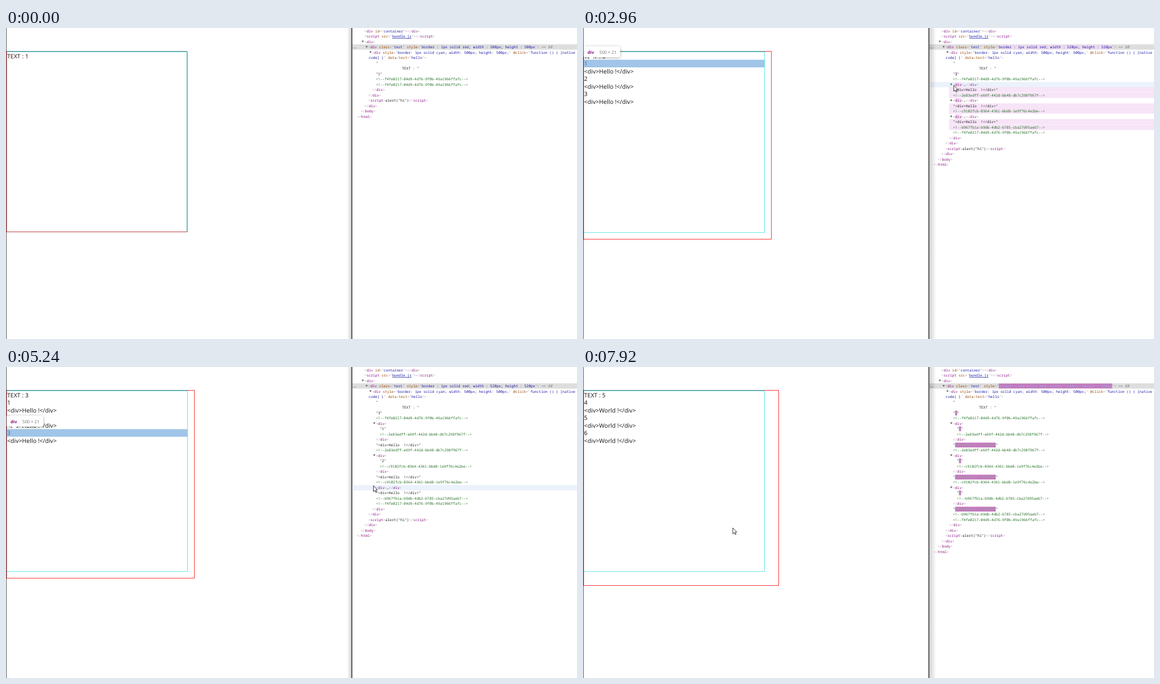
An HTML page with a canvas for the animation above (8000 ms loop, 1014x553 px).

```html
<!DOCTYPE html>
<html lang="en">
<head>
<meta charset="utf-8">
<title>Live DOM updates</title>
<style>
html, body { margin: 0; width: 100%; height: 100%; overflow: hidden; background: #fff; }
canvas { display: block; }
</style>
</head>
<body>
<canvas id="stage" width="1014" height="553"></canvas>
<script>
const ctx = document.getElementById('stage').getContext('2d');
ctx.textRendering = 'geometricPrecision';

const LOOP = 8000, W = 1014, H = 553;
const SCALE = 0.642, ROW = 9.5, SPLIT = 614;
const MONO = '6.33px "Noto Sans Mono", "DejaVu Sans Mono", monospace';
const SANS = '"Noto Sans", "Open Sans", sans-serif';
const C = {
  tag: [136, 18, 128], punct: [168, 148, 166], attr: [153, 69, 0],
  value: [26, 26, 166], comment: [35, 110, 37], text: [34, 34, 34], dim: [120, 120, 120]
};

const clicks = [830, 1790, 6480, 7640];
const opens = [3360, 4600, 5400];
const ids = [
  '2e83edff-e69f-442d-bb48-db7c298f967f',
  'c9102fcb-0364-4361-bbd8-1e9f76c4e2be',
  'b967fb1a-b9db-4db2-b785-cba27d95aeb7'
];
const ROOT_ID = 'f4fe0217-04d9-4d76-9f0b-49a1966ffafc';

// Pointer path: time, x, y
const path = [
  [290, 443, 492], [510, 255, 322], [670, 255, 322], [680, 254, 331],
  [2400, 254, 331], [2580, 247, 306], [2900, 658, 101.5], [3370, 658, 101.5],
  [3800, 655, 157], [4230, 655, 157], [4330, 654, 152], [4390, 654, 152],
  [4460, 653, 155], [4650, 653, 155], [5080, 652, 210.5], [5500, 652, 210.5],
  [5650, 600, 232], [5870, 480, 263], [5940, 459, 266], [6180, 269, 285.5],
  [6320, 269, 285.5], [6330, 262, 286], [6470, 262, 286], [6480, 267.5, 285.5],
  [7510, 267.5, 285.5], [7520, 265.5, 285.5], [8000, 265.5, 285.5]
];

const mix = (a, b, p) => a.map((v, i) => v + (b[i] - v) * p);
const rgb = (c, a = 1) => `rgba(${c.map(Math.round).join()},${a})`;

function rect(x, y, w, h, color) {
  ctx.fillStyle = color;
  ctx.fillRect(x, y, w, h);
}

function poly(points, color) {
  ctx.beginPath();
  points.forEach(([x, y]) => ctx.lineTo(x, y));
  ctx.closePath();
  ctx.fillStyle = color;
  ctx.fill();
}

function label(text, x, y, font, color) {
  ctx.font = font;
  ctx.fillStyle = color;
  ctx.fillText(text, x, y);
}

// CSS "ease" timing curve
function ease(x) {
  let lo = 0, hi = 1, s = 0.5;
  for (let i = 0; i < 20; i++) {
    s = (lo + hi) / 2;
    const bx = 0.75 * s * (1 - s) ** 2 + 0.75 * s * s * (1 - s) + s ** 3;
    if (bx < x) lo = s; else hi = s;
  }
  return 0.3 * s * (1 - s) ** 2 + 3 * s * s * (1 - s) + s ** 3;
}

// Purple update highlight, white text fading to its own colour
function flashAt(age) {
  const k = age / 1400;
  if (k < 0 || k >= 1) return null;
  const p = k < 0.8 ? ease(k / 0.8) : 1;
  const alpha = k < 0.8 ? 1 : 1 - ease((k - 0.8) / 0.2);
  return { p, bg: rgb(mix([158, 54, 153], [245, 219, 244], p), alpha) };
}

function pointer(t) {
  if (t < path[0][0]) return null;
  const i = path.findIndex(k => k[0] > t);
  const a = path[i - 1], b = path[i];
  return mix(a, b, (t - a[0]) / (b[0] - a[0])).slice(1);
}

// Tree row builders: a segment is [text, colour, flash, underline]
const open = (name, attrs = [], flash) => [
  ['<', C.punct], [name, C.tag, flash],
  ...attrs.flatMap(([k, v, f, u]) =>
    [[' ' + k, C.attr], ['="', C.punct], [v, C.value, f, u], ['"', C.punct]]),
  ['>', C.punct]
];
const close = name => [['</', C.punct], [name, C.tag], ['>', C.punct]];
const comment = id => [[`<!--${id}-->`, C.comment]];
const quoted = (s, flash) => [['"', C.text], [s, C.text, flash], ['"', C.text]];

function state(t) {
  const n = clicks.filter(c => t >= c).length;
  const last = n ? flashAt(t - clicks[n - 1]) : null;
  return {
    n, last, size: 500 + 10 * n, listed: n >= 2,
    word: n < 4 ? 'Hello' : 'World', base: n < 4 ? 1 : 4
  };
}

function treeRows(t, s) {
  const rows = [];
  const add = (level, segs, more) => rows.push({ x: 623 + 6.8 * level, segs, ...more });
  const px = s.size + 'px';

  add(2, [...open('div', [['id', 'container']]), ...close('div')]);
  add(2, [...open('script', [['src', 'bundle.js', null, true]]), ...close('script')]);
  add(2, open('div'), { arrow: 'open' });
  add(3, [...open('div', [['class', 'test'],
    ['style', `border : 1px solid red; width : ${px}; height : ${px}`, s.last]]),
    [' == ', C.dim], ['$0', C.dim, null, false, true]], { arrow: 'open', selected: true });
  add(4, open('div', [['style', 'border: 1px solid cyan; width: 500px; height: 500px;'],
    ['@click', 'function () { [native']]).slice(0, -2), { arrow: 'open' });
  add(3.1, [['code] }', C.value], ['"', C.punct], [' data-test', C.attr], ['="', C.punct],
    ['hello', C.value], ['">', C.punct]]);
  add(5, [['"', C.text]]);
  add(11.8, [['TEXT : "', C.text]]);
  add(5, quoted(String(s.n + 1), s.last));
  add(5, comment(ROOT_ID));

  if (s.listed) ids.forEach((id, i) => {
    const fresh = s.n === 2 ? s.last : null;
    const changed = s.n === 4 ? s.last : null;
    if (t >= opens[i]) {
      add(5, open('div'), { arrow: 'open', item: i });
      add(6, quoted(String(s.base + i), changed));
      add(6, comment(id));
      add(5, close('div'));
    } else {
      add(5, [...open('div', [], fresh), ['…', C.text], ...close('div')],
        { arrow: 'closed', item: i });
    }
    add(5, quoted(`<div>${s.word}  !</div>`, changed), { flash: fresh });
    add(5, comment(id), { flash: fresh });
  });

  add(5, comment(ROOT_ID));
  add(4, close('div'));
  add(3, close('div'));
  add(3, [...open('script'), ['alert("hi")', C.text], ...close('script')]);
  add(2, close('div'));
  add(1, close('body'));
  add(0, close('html'));
  return rows;
}

function drawRow(row, i, hovered) {
  const top = Math.round(i * ROW + 0.75), mid = 5.5 + i * ROW;
  if (row.selected) rect(615, top, W - 615, ROW, '#dedede');
  else if (hovered) rect(617, top, W - 617, ROW, '#ebf2fc');
  if (row.flash) rect(650, top, W - 650, ROW, row.flash.bg);
  if (row.selected) label('…', 616, mid + 1.5, '8px ' + SANS, '#555');

  const ax = row.x - 6, ay = mid - 0.5;
  if (row.arrow === 'open') poly([[ax + 1, ay - 1.6], [ax + 5, ay - 1.6], [ax + 3, ay + 1.9]], '#666');
  if (row.arrow === 'closed') poly([[ax + 1.8, ay - 2.2], [ax + 5, ay], [ax + 1.8, ay + 2.2]], '#666');

  let x = row.x;
  for (const [text, color, flash, underline, italic] of row.segs) {
    ctx.font = (italic ? 'italic ' : '') + MONO;
    const w = ctx.measureText(text).width;
    if (flash) rect(x, top + 0.5, w, 8.5, flash.bg);
    ctx.fillStyle = rgb(flash ? mix([255, 255, 255], color, flash.p) : color);
    ctx.fillText(text, x, mid + 2.4);
    if (underline) rect(x, mid + 3.2, w, 0.7, rgb(color));
    x += w;
  }
}

function drawPage(s) {
  rect(0, 0, 1, H, '#5a5a5a');
  const right = Math.floor(321.4 + 6.42 * s.n);
  const bottom = Math.floor(362.4 + 6.42 * s.n);
  if (s.n) {
    rect(322, 41, right - 321, 1, '#f33');
    rect(right, 41, 1, bottom - 40, '#f33');
    rect(1, bottom, right, 1, '#f33');
    rect(322, 42, 1, 321, '#62e8e8');
    rect(1, 363, 322, 1, '#62e8e8');
  } else {
    rect(321, 42, 1, 321, '#1a9a9a');
    rect(322, 42, 1, 321, '#8ff5f5');
    rect(1, 362, 321, 1, '#c24242');
  }
  rect(1, 41, 321, 1, '#4b8385');
  rect(1, 42, 321, 1, '#7fdcdc');
  rect(0.5, 41, 1, bottom - 40, '#931c1c');

  const lines = [`TEXT : ${s.n + 1}`];
  if (s.listed) ids.forEach((_, i) => lines.push(s.base + i, `<div>${s.word} !</div>`));
  lines.forEach((text, i) => label(text, 2, 53.7 + 13.5 * i, '10.5px ' + SANS,
    s.listed ? '#222' : '#3a1a14'));
}

function drawInspect(item) {
  const y = 56.5 + 27 * item, top = y - 24;
  rect(1, y, 321, 13.5, 'rgba(111,168,220,.66)');
  ctx.save();
  ctx.shadowColor = 'rgba(0,0,0,.3)';
  ctx.shadowBlur = 5;
  ctx.shadowOffsetY = 1;
  ctx.fillStyle = '#fff';
  ctx.beginPath();
  ctx.roundRect(1, top, 65, 19.5, 2);
  ctx.fill();
  ctx.restore();
  poly([[9, top + 19], [20, top + 19], [14.5, top + 24]], '#fff');
  label('div', 8, top + 13, 'bold 7.7px ' + SANS, '#881280');
  label(`500 × ${Math.round(13.5 / SCALE)}`, 29, top + 13, '7.7px ' + SANS, '#777');
}

// The focused window casts its shadow on the other one
function drawSplit(t) {
  const tools = t < 680 || (t >= 3360 && t < 6330);
  const edge = tools ? SPLIT - 8 : SPLIT + 13;
  const g = ctx.createLinearGradient(SPLIT, 0, edge, 0);
  g.addColorStop(0, 'rgba(0,0,0,.2)');
  g.addColorStop(1, 'rgba(0,0,0,0)');
  rect(Math.min(SPLIT, edge), 0, Math.abs(edge - SPLIT), H, g);
  rect(SPLIT - 0.5, 0, 1.5, H, '#333');
}

function drawPointer([x, y]) {
  ctx.save();
  ctx.translate(x + 0.5, y + 0.5);
  poly([[0, 0], [0, 10.6], [2.5, 8.4], [4.1, 12], [5.8, 11.3], [4.2, 7.8], [7.2, 7.6]], '#fff');
  ctx.strokeStyle = '#222';
  ctx.lineWidth = 0.9;
  ctx.stroke();
  ctx.restore();
}

function draw(t) {
  const s = state(t), at = pointer(t);
  const over = at && at[0] > SPLIT + 3 ? Math.floor((at[1] - 0.75) / ROW) : -1;
  const rows = treeRows(t, s);
  rect(0, 0, W, H, '#fff');
  drawPage(s);
  const target = rows[over];
  if (target && target.item !== undefined) drawInspect(target.item);
  rows.forEach((row, i) => drawRow(row, i, i === over));
  drawSplit(t);
  if (at) drawPointer(at);
}

const start = performance.now();
function tick() {
  draw((performance.now() - start) % LOOP);
  requestAnimationFrame(tick);
}
tick();
</script>
</body>
</html>
```
